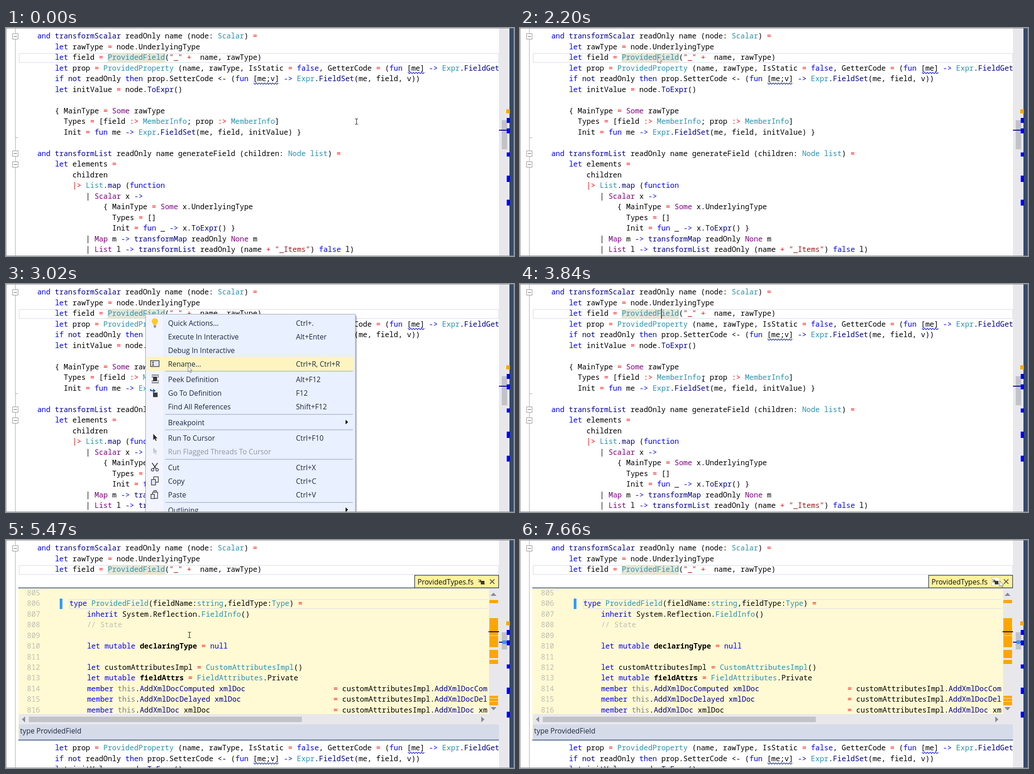
These frames come from a looping animation (1116x502 px, 8000 ms). An HTML page:

```html
<!DOCTYPE html>
<html lang="en">
<head>
<meta charset="utf-8">
<title>Peek definition</title>
<style>
html, body { margin: 0; width: 100%; height: 100%; overflow: hidden; background: #fff; }
svg { display: block; width: 100%; height: 100%; }
.code text { font: 16.13px "Noto Sans Mono", monospace; font-variant-ligatures: none; }
.ui text { font: 15.65px "Open Sans", sans-serif; fill: #1b293e; }
.ui .off { fill: #92969f; }
.ui .ink { fill: #111; }
.key { fill: #00f; }
.fn { fill: #00008b; }
.type { fill: #2b91af; }
.tag { fill: #800080; }
.op { fill: #f00; }
.str { fill: #a31515; }
.self { fill: #808080; }
.dim { fill: #bebeb4; }
.bold { font-weight: 700; }
.line { fill: none; stroke: #a5a5a5; }
.wave { fill: none; stroke: #00f; stroke-width: 1.2; }

.anim { animation: 8s step-end infinite; }
#caret { animation-name: caret; }
#menu { animation-name: menu; }
#hover { animation-name: hover; }
#rest { animation-name: rest; }
#peek { animation-name: peek; }
#content { animation-name: content; }
#peekCaret { animation-name: peekCaret; }
#thumb { animation-name: thumb; }
#peekMark { animation-name: peekMark; }
#pinHover { animation-name: pinHover; }
#closeHover { animation-name: closeHover; }
#mouse { animation-name: mouse; }
#ibeam { animation-name: ibeam; }
#arrow { animation-name: arrow; }

@keyframes caret {
  0%, 13.125%, 27.5%, 49.5%, 100% { opacity: 0 }
  7%, 21%, 48% { opacity: 1 }
}
@keyframes menu { 0%, 48%, 100% { opacity: 0 } 29.375% { opacity: 1 } }
@keyframes hover {
  0% { opacity: 0; transform: translateY(71px) }
  34.375% { opacity: 1; transform: translateY(71px) }
  36.25% { opacity: 1; transform: translateY(101px) }
  37.75% { opacity: 1; transform: translateY(160px) }
  41.125%, 100% { opacity: 1; transform: translateY(195px) }
}
@keyframes rest { 0% { transform: none } 49.5%, 100% { transform: translateY(369.6px) } }
@keyframes peek {
  0% { opacity: 0; clip-path: inset(0 0 243px 0) }
  49.5% { opacity: 1; clip-path: inset(0 0 243px 0) }
  51.375%, 100% { opacity: 1; clip-path: inset(0) }
}
@keyframes content { 0% { opacity: 0 } 53.25%, 100% { opacity: 1 } }
@keyframes peekCaret {
  0%, 56.375%, 68.375%, 81.375%, 95.75%, 100% { opacity: 0 }
  53.25%, 61.75%, 75%, 87.75% { opacity: 1 }
}
@keyframes thumb { 0% { transform: none } 49.5%, 100% { transform: scaleY(.594) } }
@keyframes peekMark { 0% { opacity: 0 } 49.5%, 100% { opacity: 1 } }
@keyframes pinHover { 0%, 84.75% { opacity: 0 } 81.375%, 92.75%, 100% { opacity: 1 } }
@keyframes closeHover { 0%, 92.75%, 100% { opacity: 0 } 84.75% { opacity: 1 } }
@keyframes ibeam { 0%, 48% { opacity: 1 } 27.5%, 81.375%, 100% { opacity: 0 } }
@keyframes arrow { 0%, 43% { opacity: 0 } 27.5%, 81.375%, 100% { opacity: 1 } }
@keyframes mouse {
  0% { transform: translate(770px, 206px) }
  11.625% { transform: translate(718px, 195px) }
  13.125% { transform: translate(595px, 163px) }
  15% { transform: translate(474px, 115px) }
  16.5% { transform: translate(386px, 77px) }
  18% { transform: translate(330px, 53px) }
  19.5% { transform: translate(306px, 47px) }
  21% { transform: translate(301px, 55px) }
  22.875% { transform: translate(303px, 56px) }
  26% { transform: translate(304px, 58px) }
  27.5% { transform: translate(303px, 64px) }
  29.375% { transform: translate(303px, 65px) }
  31.25% { transform: translate(302px, 65px) }
  34.375% { transform: translate(316px, 77px) }
  36.25% { transform: translate(368px, 113px) }
  37.75% { transform: translate(400px, 181px) }
  39.625% { transform: translate(405px, 187px) }
  41.125% { transform: translate(409px, 216px) }
  48% { transform: translate(403px, 209px) }
  75% { transform: translate(404px, 207px) }
  76.875% { transform: translate(452px, 197px) }
  78.375% { transform: translate(650px, 160px) }
  79.875% { transform: translate(900px, 118px) }
  81.375% { transform: translate(1052px, 89px) }
  83.25% { transform: translate(1055px, 88px) }
  84.75% { transform: translate(1062px, 88px) }
  86.25% { transform: translate(1066px, 89px) }
  87.75% { transform: translate(1068px, 90px) }
  91.25% { transform: translate(1064px, 90px) }
  92.75% { transform: translate(1058px, 89px) }
  94.25% { transform: translate(1055px, 89px) }
  95.75%, 100% { transform: translate(1054px, 90px) }
}
</style>
</head>
<body>
<svg viewBox="0 0 1116 502" preserveAspectRatio="none">
  <defs>
    <clipPath id="peekClip"><path d="M28 107H1058V383H28z"/></clipPath>
    <path id="pointer" d="M0 0V13.5L3.2 10.6L5.4 15.4L7.4 14.4L5.3 9.8H9.3z"/>
  </defs>
  <rect width="1116" height="502" fill="#fff"/>

  <path class="line" d="M20.5 0V502"/>
  <rect x="29" y="56" width="1053" height="20" fill="none" stroke="#e9e9f1" stroke-width="2"/>
  <rect x="223" y="55" width="126" height="22" fill="#e4e6d6"/>
  <g id="top" class="code"></g>
  <g id="rest" class="code anim"></g>
  <rect id="caret" class="anim" x="310" y="54" width="1.4" height="22"/>

  <g id="peek" class="anim">
    <rect x="27" y="105" width="1056" height="336" fill="#fffad4"/>
    <rect x="28" y="383" width="1055" height="23" fill="#e8e8ec"/>
    <rect x="28" y="406" width="1055" height="34" fill="#d6dbe9"/>
    <path d="M27 105.5H1083M27 440.5H1083" stroke="#1f3a6e" stroke-width="1.4"/>
    <rect x="897.7" y="77.7" width="184.6" height="27.6" fill="#fff29d" stroke="#33415c" stroke-width="1.4"/>
    <g class="ui"><text class="ink" x="904" y="98">ProvidedTypes.fs</text></g>
    <rect id="pinHover" class="anim" x="1036" y="82" width="18" height="19" fill="#fffcf0" stroke="#e5c365"/>
    <rect id="closeHover" class="anim" x="1059" y="82" width="18" height="19" fill="#fffcf0" stroke="#e5c365"/>
    <path d="M1043 90h8v7h-8z" fill="#3b3826"/>
    <path d="M1038 87l5 4M1043 87v5h-5M1043 97h9" fill="none" stroke="#3b3826" stroke-width="1.5"/>
    <path d="M1063 86.500l10 10m0-10l-10 10" stroke="#5c5840" stroke-width="1.8"/>
    <g id="content" class="anim">
      <rect x="1061" y="107" width="22" height="299" fill="#e8e8ec"/>
      <rect x="139" y="131" width="960" height="20" fill="none" stroke="#e9e9e6" stroke-width="2" clip-path="url(#peekClip)"/>
      <rect x="118" y="129" width="6" height="23" fill="#39f"/>
      <g id="peekCode" class="code" clip-path="url(#peekClip)"></g>
      <rect id="peekCaret" class="anim" x="187" y="129" width="1.5" height="22"/>
      <path d="M1062 132h19v7h-19zM1062 172h19v38h-19zM1062 211h19v25h-19zM1062 242h19v18h-19zM1062 264h19v9h-19zM1062 343h19v5h-19zM1062 349h19v6h-19zM1062 356h19v8h-19z" fill="#ffa500"/>
      <path d="M1060 202H1083" stroke="#00008b" stroke-width="2"/>
      <rect x="50" y="389" width="600" height="12" fill="#c2c3c9"/>
      <path d="M1064.500 123l6.500-7 6.500 7zM1064.500 368l6.500 7 6.500-7zM42 388.500l-7 6.500 7 6.500zM1044 388.500l7 6.500-7 6.500z" fill="#868999"/>
      <g class="ui"><text x="31" y="426">type ProvidedField</text></g>
    </g>
  </g>

  <g>
    <rect x="1083" width="23" height="502" fill="#e8e8ec"/>
    <g transform="translate(1089 203)"><rect id="thumb" class="anim" width="12" height="64" fill="#c2c3c9"/></g>
    <path d="M1083 225H1102" stroke="#00008b" stroke-width="2"/>
    <rect id="peekMark" class="anim" x="1091" y="221" width="8" height="8" fill="#39f"/>
    <path d="M1106 0h10v502h-10z" fill="#35496a"/>
    <path d="M1100 198h7v11h-7zM1100 221h7v11h-7zM1100 274h7v9h-7zM1100 325h7v14h-7zM1100 378h7v13h-7z" fill="#00f"/>
    <rect x="1099" y="179" width="8" height="9" fill="#ffa500"/>
  </g>

  <g id="menu" class="ui anim">
    <path d="M310 70H771V502H310z" fill="#000" opacity=".22"/>
    <rect x="306.500" y="66.500" width="461" height="450" fill="#e9f0ff" stroke="#959fb5"/>
    <rect x="308" y="68" width="37" height="440" fill="#f2f4fe"/>
    <rect id="hover" class="anim" x="309" width="455" height="31" fill="#fdf4bf"/>
    <g id="items"></g>
    <g fill="none" stroke="#3a3d45" stroke-width="1.5">
      <path d="M324 91v-2q-4-4-4-7a7 6.500 0 0 1 14 0q0 3-4 7v2z" fill="#fdc92b" stroke="none"/>
      <path d="M324 92.500h6M325 95h4" stroke="#55575c"/>
      <path d="M317.700 168.700h18.600v13h-18.600zM321 172h4m-2 0v7m-2 0h4" fill="#e6e7f3"/>
      <path d="M320 200.500h16M320 217.500h16M320 204.500h3M333 204.500h3M320 213.500h3M333 213.500h3"/>
      <path d="M323 204h9v10h-9z" fill="#3a3d45" stroke="none"/>
      <path d="M323 239h10v10h-10z" fill="#3a3d45" stroke="none"/>
      <path d="M318 231v4h8M323 231.500l4 3.500-4 3.500" stroke="#00539c" stroke-width="2"/>
      <path d="M321 394l9 13M333 394l-9 13" stroke-width="2"/>
      <circle cx="322" cy="409" r="2.800"/><circle cx="332" cy="409" r="2.800"/>
      <path d="M324.500 424.500h10v12h-10z" fill="#f2f4fe"/>
      <path d="M319.500 430.500h9v12h-9z" fill="#e6e7f3"/>
      <path d="M322 458.500h11v13.500h-11zM325 458v-3h5v3" fill="#f2f4fe"/>
      <path d="M318.500 463h7.500v9.500h-7.500z" fill="#e6e7f3"/>
    </g>
    <use href="#pointer" x="323.500" y="330" fill="#26282e"/>
    <use href="#pointer" x="323.500" y="360" fill="#c5c8d0"/>
    <path d="M746 299l5.500 5-5.500 5zM746 492l5.500 5-5.500 5z"/>
  </g>

  <g id="mouse" class="anim">
    <path id="ibeam" class="anim" d="M-3.500-6H-1L0-5L1-6H3.500M0-5V5M-3.500 6H-1L0 5L1 6H3.500" fill="none" stroke="#222" stroke-width="1.200"/>
    <use id="arrow" class="anim" href="#pointer" transform="scale(.94)" fill="#fff" stroke="#555" stroke-width=".9"/>
  </g>
  <rect x=".5" y=".5" width="1115" height="501" fill="none" stroke="#8b8b8b"/>
</svg>

<script>
const CHAR = 9.678, PITCH = 23.5;

const editor = `and transformScalar readOnly name (node: Scalar) =
    let rawType = node.UnderlyingType
    let field = ProvidedField("_" +  name, rawType)
    let prop = ProvidedProperty (name, rawType, IsStatic = false, GetterCode = (fun [me] -> Expr.FieldGet
    if not readOnly then prop.SetterCode <- (fun [me;v] -> Expr.FieldSet(me, field, v))
    let initValue = node.ToExpr()

    { MainType = Some rawType
      Types = [field :> MemberInfo; prop :> MemberInfo]
      Init = fun me -> Expr.FieldSet(me, field, initValue) }

and transformList readOnly name generateField (children: Node list) =
    let elements =
        children
        |> List.map (function
           | Scalar x ->
               { MainType = Some x.UnderlyingType
                 Types = []
                 Init = fun _ -> x.ToExpr() }
           | Map m -> transformMap readOnly None m
           | List l -> transformList readOnly (name + "_Items") false l)`.split('\n');

const member = name => `    member this.${name} xmlDoc`.padEnd(60) + `= customAttributesImpl.${name} xmlDoc`;
const definition = ['', 'type ProvidedField(fieldName:string,fieldType:Type) =',
  '    inherit System.Reflection.FieldInfo()', '    // State', '',
  '    let mutable declaringType = null', '',
  '    let customAttributesImpl = CustomAttributesImpl()',
  '    let mutable fieldAttrs = FieldAttributes.Private',
  ...['AddXmlDocComputed', 'AddXmlDocDelayed', 'AddXmlDoc'].map(member)];

// Patterns run on escaped text, hence &gt; in the operators.
const word = list => `\\b(?:${list})\\b`;
const rules = {
  str: '"[^"]*"',
  dim: '//.*',
  tag: '(?<=\\| )(?:Scalar|Map|List)\\b|' + word('Some|None'),
  key: '-&gt;|' + word('and|let|if|then|fun|function|false|null|type|inherit|mutable|member'),
  fn: word('AddXmlDoc(?:Computed|Delayed) xmlDoc|AddXmlDoc|transform\\w+|ToExpr|FieldSet|FieldGet|map|not'),
  type: word('Provided\\w+|Scalar|MemberInfo|Expr|Node list|List|string|Type|FieldInfo|FieldAttributes|CustomAttributesImpl'),
  self: word('this'),
  bold: word('declaringType|fieldAttrs'),
  op: '[=+]|[:|]&gt;'
};
const token = new RegExp(Object.entries(rules).map(([name, p]) => `(?<${name}>${p})`).join('|'), 'g');

function paint(source) {
  return source.replace(/</g, '&lt;').replace(/>/g, '&gt;').replace(token, (match, ...rest) => {
    const groups = rest.at(-1);
    const style = Object.keys(groups).find(name => groups[name] !== undefined);
    return `<tspan class="${style}">${match}</tspan>`;
  });
}

function codeLine(source, x, y) {
  const indent = source.search(/\S/);
  return indent < 0 ? '' :
    `<text xml:space="preserve" x="${x + indent * CHAR}" y="${y}">${paint(source.trim())}</text>`;
}

const wave = (x, end, y) => `<path class="wave" d="M${x} ${y}${'l3 3l3-3'.repeat((end - x) / 6)}"/>`;
const fold = y => `<rect x="14.5" y="${y - 5.5}" width="12" height="12" fill="#fff" stroke="#8c8c8c"/>
  <path d="M17 ${y + .5}h7" stroke="#555"/>`;
const fill = (id, html) => document.getElementById(id).innerHTML = html;

const rows = editor.map((source, i) => codeLine(source, 68.7, 23 + PITCH * i));
fill('top', fold(18) + rows.slice(0, 3).join(''));
fill('rest', fold(276) + fold(300) + '<path class="line" d="M20.500 241.500h6"/>' +
  rows.slice(3).join('') + wave(883, 919, 97.5) + wave(544, 600, 121));

fill('peekCode', definition.map((source, i) => {
  const y = 122 + 23.43 * i;
  return `<text class="dim" x="46" y="${y}">${805 + i}</text>` + codeLine(source, 139.2, y);
}).join(''));

const items = [
  [86, 'Quick Actions...', 'Ctrl+.'], [116, 'Execute In Interactive', 'Alt+Enter'],
  [146, 'Debug In Interactive'], [176, 'Rename...', 'Ctrl+R, Ctrl+R'],
  [210.5, 'Peek Definition', 'Alt+F12'], [240.5, 'Go To Definition', 'F12'],
  [270.5, 'Find All References', 'Shift+F12'], [305, 'Breakpoint'],
  [339.5, 'Run To Cursor', 'Ctrl+F10'], [369.5, 'Run Flagged Threads To Cursor'],
  [404, 'Cut', 'Ctrl+X'], [434, 'Copy', 'Ctrl+C'], [464, 'Paste', 'Ctrl+V'], [498, 'Outlining']
];
fill('items', items.map(([y, label, keys = '']) =>
  `<text x="356" y="${y + 5.5}"${label.includes('Flagged') ? ' class="off"' : ''}>${label}</text>
   <text x="637" y="${y + 5.5}">${keys}</text>`).join('') +
  [192, 287, 321, 386, 481].map(y => `<path d="M350 ${y}H762" stroke="#a9b4c8" stroke-width="1.6"/>`).join(''));
</script>
</body>
</html>
```
